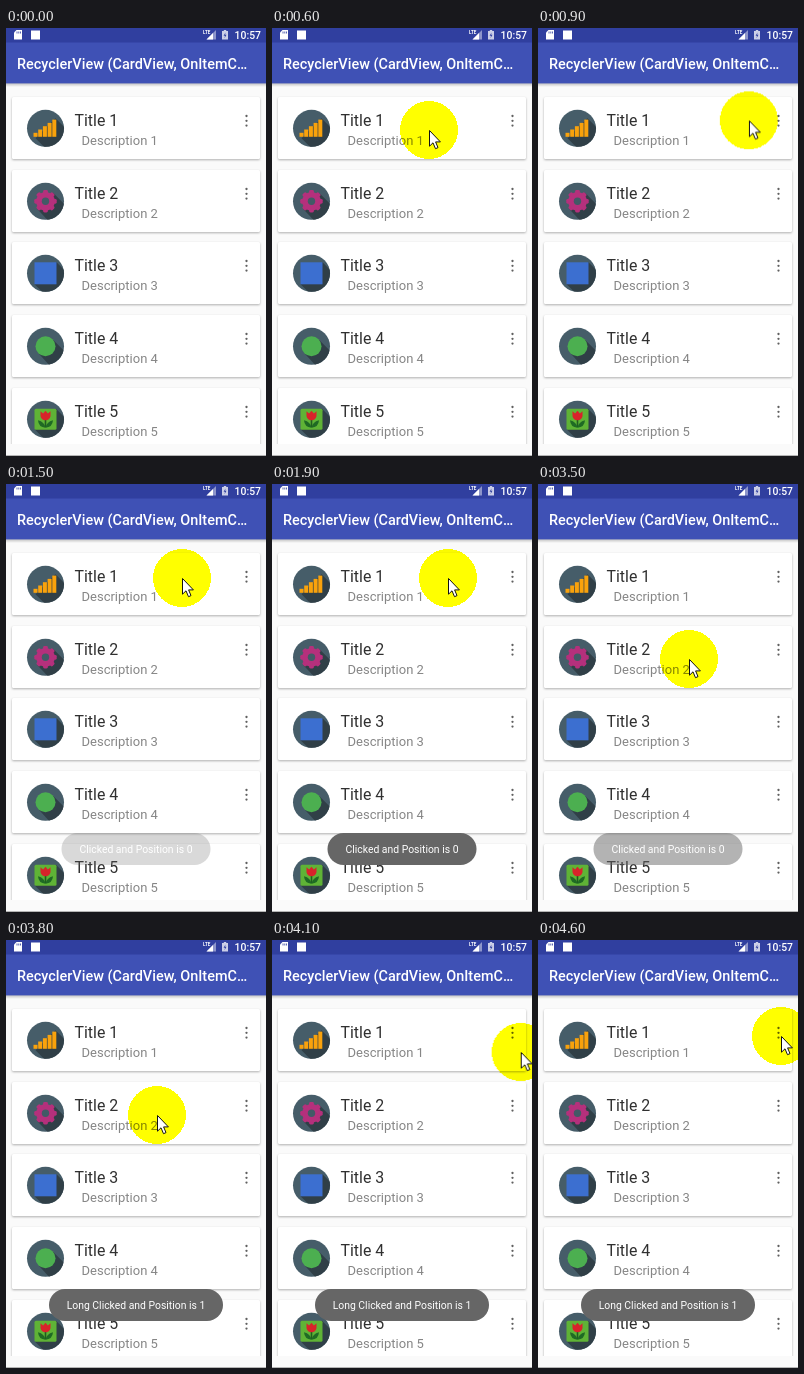
An HTML page for the animation above (5 s loop, 260 px wide and 428 px high).

```html
<!DOCTYPE html>
<html lang="en">
<head>
<meta charset="utf-8">
<title>Card list</title>
<style>
  html, body { margin: 0; width: 100%; height: 100%; overflow: hidden; background: #fafafa; }
  svg { display: block; width: 260px; height: 428px; font-family: Roboto, "Liberation Sans", sans-serif; }
  .card { fill: #fff; filter: drop-shadow(0 1px 1px rgba(0, 0, 0, .3)); }
  .title { font-size: 15.9px; fill: #303030; }
  .desc { font-size: 13px; fill: #868686; }
  .toast { opacity: 0; }
  .toast rect { fill: #666; }
  .toast text { font-size: 10.4px; fill: #fff; text-anchor: middle; }
  .bar { font-weight: 500; fill: #fff; }
  #halo { fill: #ff0; mix-blend-mode: multiply; shape-rendering: crispEdges; }
</style>
</head>
<body>
<svg viewBox="0 0 260 428">
  <defs>
    <clipPath id="list"><rect y="55" width="260" height="361"/></clipPath>
    <clipPath id="disc"><circle r="18.5"/></clipPath>
    <linearGradient id="shade" x2="0" y2="1">
      <stop stop-opacity=".24"/><stop offset="1" stop-opacity="0"/>
    </linearGradient>
  </defs>
  <rect width="260" height="428" fill="#fafafa"/>
  <g id="rows" clip-path="url(#list)"></g>
  <rect y="427" width="260" height="1" fill="#b5b5b5"/>

  <rect y="55" width="260" height="4" fill="url(#shade)"/>
  <rect width="260" height="55.4" fill="#3f51b5"/>
  <rect width="260" height="14.5" fill="#303f9f"/>
  <g class="bar">
    <path d="M10.5 2H16V11.5H8V4.5Z"/>
    <path d="M11 3.5V5.5M12.8 3.5V5.5M14.5 3.5V5.5" stroke="#303f9f" stroke-width=".8"/>
    <rect x="25" y="2.5" width="9" height="9"/>
    <text x="197" y="6" font-size="4.6" font-weight="700">LTE</text>
    <path d="M210 2V11.5H200.5Z" opacity=".45"/>
    <path d="M207 5V11.5H200.5Z"/>
    <path d="M217.8 2H220.2V3H222V11.5H216V3H217.8Z" opacity=".75"/>
    <path d="M219.5 4.5L217.6 7.8H219L218.5 10.2L220.5 6.8H219.1Z" fill="#303f9f"/>
    <text x="255" y="10.6" font-size="10.4" text-anchor="end">10:57</text>
    <text x="11" y="41" font-size="14.44">RecyclerView (CardView, OnItemC…</text>
  </g>

  <g class="toast" id="click">
    <rect x="55.5" y="349" width="149" height="32" rx="16"/>
    <text x="130" y="369">Clicked and Position is 0</text>
  </g>
  <g class="toast" id="hold">
    <rect x="43" y="349" width="174" height="32" rx="16"/>
    <text x="130" y="369">Long Clicked and Position is 1</text>
  </g>

  <circle id="halo" r="29"/>
  <path id="arrow" d="M.5 .5V16.2L4 12.8L6.5 18.7L9 17.6L6.6 11.9H11.4Z" fill="#fff" stroke="#111" stroke-width="1"/>
</svg>
<script>
  const LOOP = 5000, TICKS = 50;
  const $ = id => document.getElementById(id);
  const repeat = (n, draw) => Array.from({ length: n }, (_, i) => draw(i)).join('');

  const bars = repeat(5, i => {
    const h = 4 + i * 3.3;
    return `<rect x="${-12 + i * 4.7}" y="${8.5 - h}" width="4" height="${h}"/>`;
  });
  const teeth = repeat(4, i =>
    `<rect x="-2.4" y="-11.2" width="4.8" height="22.4" rx="1.4" transform="rotate(${i * 45})"/>`);

  // Symbols with the half size that casts the long shadow
  const icons = [
    [10, `<g fill="#f9a20c">${bars}</g>`],
    [8, `<g fill="#b5307c">${teeth}<circle r="9.4"/></g><circle r="3.7" fill="#425a66"/>`],
    [11, '<rect x="-11" y="-11" width="22" height="22" fill="#3c6fd0"/>'],
    [7, '<circle r="10" fill="#4caf50"/>'],
    [10.5,
      `<rect x="-11" y="-10.5" width="22" height="21" rx="1.5" fill="#5fb336"/>
       <path d="M0 0V8" stroke="#1f5e20" stroke-width="1.6"/>
       <path d="M0 8.5Q-7 8 -7.5 1Q-1 2.5 0 8.5Q1 2.5 7.5 1Q7 8 0 8.5Z" fill="#1f6a24"/>
       <path d="M-5 -8L-2.4 -5.8L0 -8.6L2.4 -5.8L5 -8V-3Q4 1 0 1Q-4 1 -5 -3Z" fill="#d8232a"/>`]
  ];

  $('rows').innerHTML = repeat(icons.length, i => {
    const [s, symbol] = icons[i];
    return `
    <g transform="translate(0 ${Math.round(69 + i * 72.7)})">
      <rect class="card" x="6" width="248" height="62" rx="1.5"/>
      <g transform="translate(39.5 31.3)">
        <circle r="18.5" fill="#465d69"/>
        <path d="M${-s} ${s}L${s} ${-s}l30 30V40H${30 - s}Z" fill="#303f47" clip-path="url(#disc)"/>
        ${symbol}
      </g>
      <text class="title" x="68.5" y="29.3">Title ${i + 1}</text>
      <text class="desc" x="75.5" y="47.5">Description ${i + 1}</text>
      <g fill="#606060">${repeat(3, d => `<circle cx="240.5" cy="${19 + d * 4.8}" r="1.15"/>`)}</g>
    </g>`;
  });

  const ramp = (tick, from, to) => Math.min(1, Math.max(0, (tick - from) / (to - from)));

  // Pointer strokes: quadratic curves from start over a bend to an end point
  const strokes = [
    { from: 0, to: 1, pts: [[-60, -60], [-60, -60], [141, 98]] },
    { from: 1, to: 4, pts: [[141, 98], [141, 106], [141, 114]] },
    { from: 6, to: 11, pts: [[157, 102], [255, 88], [176, 94]] },
    { from: 19, to: 25, pts: [[176, 94], [122, 275], [151, 175]] },
    { from: 38, to: 40, pts: [[151, 175], [198, 142], [246, 109]] },
    { from: 40, to: 46, pts: [[246, 109], [256, 121], [243, 96]] }
  ];

  function move(tick) {
    const { from, to, pts: [a, b, c] } = strokes.filter(s => s.from <= tick).pop();
    const t = ramp(tick, from, to), u = 1 - t;
    const [x, y] = a.map((p, k) => u * u * p + 2 * u * t * b[k] + t * t * c[k]);
    return { transform: `translate(${x}px, ${y}px)` };
  }

  // The picture changes ten times a second, so every pose holds for one tick
  function play(id, pose) {
    const frames = Array.from({ length: TICKS + 1 }, (_, i) =>
      ({ offset: i / TICKS, easing: 'step-end', ...pose(Math.min(i, TICKS - 1)) }));
    $(id).animate(frames, { duration: LOOP, iterations: Infinity });
  }

  play('halo', move);
  play('arrow', move);
  play('click', tick => ({ opacity: ramp(tick, 14, 18) - ramp(tick, 34, 36) }));
  play('hold', tick => ({ opacity: ramp(tick, 35, 38) }));
</script>
</body>
</html>
```
